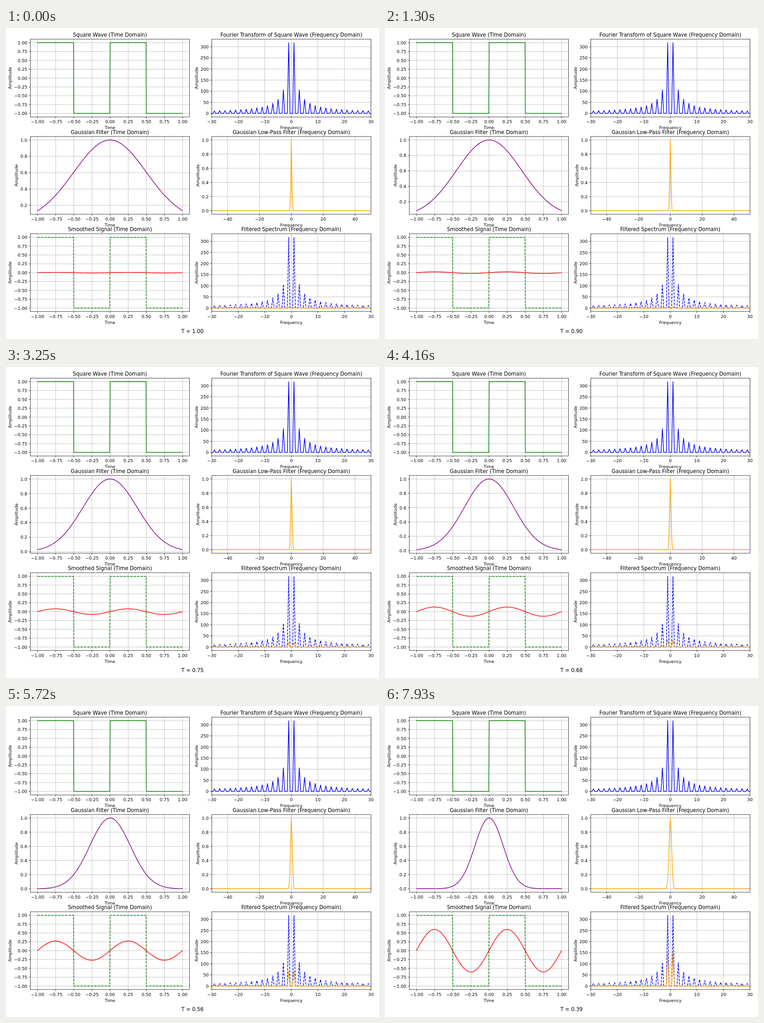
Animation, 820 px wide and 683 px high, one loop 8000 ms. Source, as an HTML page with a canvas:

```html
<!DOCTYPE html>
<html lang="en">
<head>
<meta charset="utf-8">
<title>Gaussian smoothing of a square wave</title>
<style>
html, body { margin: 0; width: 100%; height: 100%; overflow: hidden; background: #fff; }
canvas { display: block; }
</style>
</head>
<body>
<canvas width="820" height="683"></canvas>
<script>
const ctx = document.querySelector('canvas').getContext('2d');
const PT = 820 / 1200 * 100 / 72; // one typographic point in stage pixels
const SMALL = 10 * PT, LARGE = 12 * PT;
const LEFT = [53.5, 452.3], TOP = [24.5, 238.2, 451.9], W = 350, H = 170.8;
const N = 500, STEP = 130, LOOP = 8000;

const range = (a, b, step) =>
  Array.from({ length: Math.round((b - a) / step) + 1 }, (_, i) => a + i * step);
const samples = Array.from({ length: N }, (_, i) => i - N / 2);
const times = samples.map(n => n * 2 / N);
const freqs = samples.map(n => n / 2);

const square = t => (t >= -0.5 && t < 0) || t >= 0.5 ? -1 : 1;
const spectrum = f => Math.abs(f % 2) === 1 ? 4 / Math.sin(Math.PI * Math.abs(f) / 250) : 0;
const bell = (t, T) => Math.exp(-2 * (t / T) ** 2);
const lowPass = (f, T) => Math.exp(-((Math.PI * T * f) ** 2) / 2);
const smooth = (t, T) => [1, 3, 5].reduce((sum, m) =>
  sum + 2 / N * spectrum(m) * lowPass(m, T) * Math.sin(2 * Math.PI * m * (t + 1 / N)), 0);

function text(str, x, y, size, align = 'center') {
  ctx.font = `${size}px "DejaVu Sans", sans-serif`;
  ctx.textAlign = align;
  ctx.fillText(str, x, y);
}

function segment(x1, y1, x2, y2) {
  ctx.beginPath();
  ctx.moveTo(x1, y1);
  ctx.lineTo(x2, y2);
  ctx.stroke();
}

// Draws a set of axes; each curve is { pts, color, dash }.
function chart(col, row, title, xLabel, xLim, xTicks, xDigits, data, yTicks, yDigits, curves) {
  const left = LEFT[col], top = TOP[row], bottom = top + H;
  const margin = (data[1] - data[0]) * 0.05;
  const low = data[0] - margin, high = data[1] + margin;
  const px = x => left + (x - xLim[0]) / (xLim[1] - xLim[0]) * W;
  const py = y => bottom - (y - low) / (high - low) * H;
  const shownY = yTicks.filter(y => y >= low && y <= high);
  const format = (v, digits) => v.toFixed(digits).replace('-', '\u2212');

  ctx.lineWidth = 0.8 * PT;
  ctx.lineCap = 'butt';
  ctx.strokeStyle = '#b0b0b0';
  xTicks.forEach(x => segment(px(x), top, px(x), bottom));
  shownY.forEach(y => segment(left, py(y), left + W, py(y)));

  ctx.save();
  ctx.beginPath();
  ctx.rect(left, top, W, H);
  ctx.clip();
  ctx.lineWidth = 1.5 * PT;
  ctx.lineJoin = 'round';
  for (const { pts, color, dash } of curves) {
    ctx.strokeStyle = color;
    ctx.lineCap = dash ? 'butt' : 'square';
    ctx.setLineDash(dash ? [5.55 * PT, 2.4 * PT] : []);
    ctx.beginPath();
    pts.forEach(([x, y]) => ctx.lineTo(px(x), py(y)));
    ctx.stroke();
  }
  ctx.restore();

  ctx.strokeStyle = ctx.fillStyle = '#000';
  ctx.strokeRect(left, top, W, H);
  const tick = 3.5 * PT, pad = 7 * PT;
  for (const x of xTicks) {
    segment(px(x), bottom, px(x), bottom + tick);
    text(format(x, xDigits), px(x), bottom + pad + 0.76 * SMALL, SMALL);
  }
  let widest = 0;
  for (const y of shownY) {
    const label = format(y, yDigits);
    segment(left - tick, py(y), left, py(y));
    text(label, left - pad, py(y) + 0.38 * SMALL, SMALL, 'right');
    widest = Math.max(widest, ctx.measureText(label).width);
  }
  text(title, left + W / 2, top - 6 * PT, LARGE);
  text(xLabel, left + W / 2, bottom + pad + 4 * PT + 1.728 * SMALL, SMALL);
  ctx.save();
  ctx.translate(left - pad - widest - 4 * PT - 0.208 * SMALL, top + H / 2);
  ctx.rotate(-Math.PI / 2);
  text('Amplitude', 0, 0, SMALL);
  ctx.restore();
}

const trace = (xs, fn) => xs.map(x => [x, fn(x)]);
const wave = trace(times, square);
const peaks = trace(freqs, spectrum);
const dashedPeaks = peaks.filter(([f]) => f >= -107.5);

const quarters = range(-1, 1, 0.25), tens = range(-30, 30, 10);
const fifths = range(0, 1, 0.2), fifties = range(0, 300, 50);
const peakSpan = [0, spectrum(1)];

const timeChart = (row, title, ...rest) =>
  chart(0, row, title + ' (Time Domain)', 'Time', [-1.0998, 1.0958], quarters, 2, ...rest);
const freqChart = (row, title, lim, ticks, ...rest) =>
  chart(1, row, title + ' (Frequency Domain)', 'Frequency', [-lim, lim], ticks, 0, ...rest);

function draw(T) {
  ctx.fillStyle = '#fff';
  ctx.fillRect(0, 0, 820, 683);

  timeChart(0, 'Square Wave', [-1, 1], quarters, 2, [{ pts: wave, color: 'green' }]);
  freqChart(0, 'Fourier Transform of Square Wave', 30, tens, peakSpan, fifties, 0,
    [{ pts: peaks, color: 'blue' }]);

  timeChart(1, 'Gaussian Filter', [bell(1, T), 1], fifths, 1,
    [{ pts: trace(times, t => bell(t, T)), color: 'purple' }]);
  freqChart(1, 'Gaussian Low-Pass Filter', 50, range(-40, 40, 20), [0, 1], fifths, 1,
    [{ pts: trace(freqs, f => lowPass(f, T)), color: 'orange' }]);

  timeChart(2, 'Smoothed Signal', [-1, 1], quarters, 2, [
    { pts: wave, color: 'green', dash: true },
    { pts: trace(times, t => smooth(t, T)), color: 'red' }
  ]);
  freqChart(2, 'Filtered Spectrum', 30, tens, peakSpan, fifties, 0, [
    { pts: dashedPeaks, color: 'blue', dash: true },
    { pts: trace(freqs, f => spectrum(f) * lowPass(f, T)), color: 'orange' }
  ]);

  text('T = ' + T.toFixed(2), 410, 669.8, LARGE);
}

let start, shown;
function frame(now) {
  start ??= now;
  const step = Math.floor((now - start) % LOOP / STEP);
  if (step !== shown) draw((100 - step) / 100);
  shown = step;
  requestAnimationFrame(frame);
}
draw(1);
requestAnimationFrame(frame);
</script>
</body>
</html>
```
